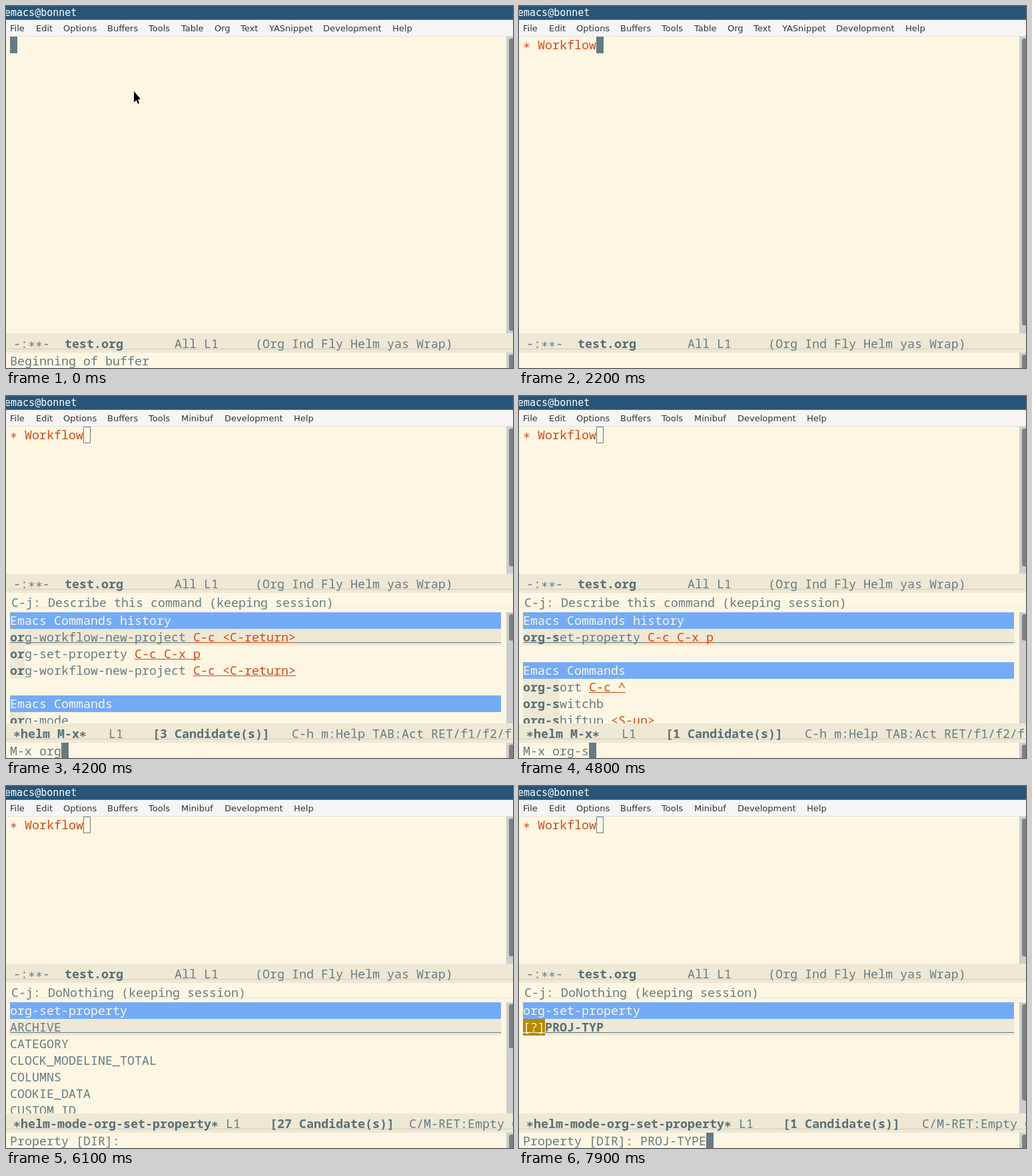
Animation, 761 px wide and 544 px high, one loop 8 s. Source, as an HTML page with a canvas:

```html
<!DOCTYPE html>
<html lang="en">
<head>
<meta charset="utf-8">
<title>Editor session</title>
<style>
html, body { margin: 0; width: 100%; height: 100%; overflow: hidden; background: #fdf6e3; }
canvas { display: block; }
</style>
</head>
<body>
<canvas id="stage" width="761" height="544"></canvas>
<script>
const ctx = document.getElementById('stage').getContext('2d');
const LOOP = 8000, CELL = 11, ROW = 25, LEFT = 6;
const C = {
  paper: '#fdf6e3', bar: '#eee8d5', text: '#657b83', strong: '#586e75', orange: '#cb4b16',
  blue: '#74abf7', gold: '#b58900', line: '#cccec4', trough: '#cdcdcd', slider: '#7e8182'
};
const MONO = '"Noto Sans Mono", "DejaVu Sans Mono", monospace';

// Font size whose advance equals one character cell.
ctx.font = `100px ${MONO}`;
const SIZE = CELL * 100 / ctx.measureText('m').width;
const REGULAR = `${SIZE}px ${MONO}`, BOLD = `bold ${SIZE}px ${MONO}`;

const MENU = [['File', 6], ['Edit', 45], ['Options', 86], ['Buffers', 152], ['Tools', 214]];
const ORG_MENU = [...MENU, ['Table', 263], ['Org', 313], ['Text', 352], ['YASnippet', 395],
  ['Development', 476], ['Help', 580]];
const MINI_MENU = [...MENU, ['Minibuf', 263], ['Development', 328], ['Help', 432]];

const HISTORY = ['org-workflow-new-project|C-c <C-return>', 'org-set-property|C-c C-x p',
  'org-workflow-new-project|C-c <C-return>', 'magit-status|C-x g'];
const COMMANDS = {
  '': [], o: ['org-mode'], or: ['org-mode'], org: ['org-mode'], 'org-': ['org-mode'],
  'org-s': ['org-sort|C-c ^', 'org-switchb', 'org-shiftup|<S-up>'],
  'org-se': ['org-set-tags', 'org-set-effort|C-c C-x e', 'org-search-view'],
  'org-set': ['org-set-tags', 'org-set-effort|C-c C-x e', 'org-set-tags-command|C-c C-q'],
  'org-set-': ['org-set-tags', 'org-set-effort|C-c C-x e', 'org-set-tags-command|C-c C-q']
};
const PROPERTIES = ['ARCHIVE', 'CATEGORY', 'CLOCK_MODELINE_TOTAL', 'COLUMNS', 'COOKIE_DATA', 'CUSTOM_ID'];
const WITH_P = ['DESCRIPTION', 'EXPORT_AUTHOR', 'EXPORT_DATE', 'EXPORT_FILE_NAME', 'EXPORT_OPTIONS'];

// [time, typed text] and, for the prompts, [time, typed, filtered]
const HEADING = [[0, ''], [500, '*'], [900, '* '], [1200, '* W'], [1400, '* Wo'], [1500, '* Wor'],
  [1600, '* Work'], [1900, '* Workf'], [2000, '* Workfl'], [2100, '* Workflo'], [2200, '* Workflow']];
const COMMAND = [[3700, '', ''], [4000, 'o', ''], [4100, 'or', 'o'], [4200, 'org', 'or'],
  [4300, 'org-', 'org'], [4400, 'org-', 'org-'], [4800, 'org-s', 'org-s'], [4900, 'org-se', 'org-se'],
  [5000, 'org-set', 'org-set'], [5100, 'org-set-', 'org-set-']];
const PROPERTY = [[5500, '', ''], [6600, 'P', ''], [6700, 'P', 'P'], [6800, 'PR', 'P'], [6900, 'PR', 'PR'],
  [7000, 'PRO', 'PRO'], [7100, 'PROJ', 'PROJ'], [7300, 'PROJ-', 'PROJ-'], [7500, 'PROJ-T', 'PROJ-'],
  [7600, 'PROJ-T', 'PROJ-T'], [7700, 'PROJ-TY', 'PROJ-TY'], [7800, 'PROJ-TYP', 'PROJ-TYP'],
  [7900, 'PROJ-TYPE', 'PROJ-TYP']];

const at = (steps, t) => steps.filter(s => s[0] <= t).pop();

function rect(x, y, w, h, color) {
  ctx.fillStyle = color;
  ctx.fillRect(x, y, w, h);
}

// Draws one run of cells and returns the x where the next begins.
function put(s, x, top, { color = C.text, bold, bg, under } = {}) {
  const w = s.length * CELL;
  if (bg) rect(x, top, w, ROW, bg);
  if (under) rect(x, top + 20, w, 1, color);
  ctx.font = bold ? BOLD : REGULAR;
  ctx.fillStyle = color;
  // The asterisk sits at mid-height, as the operator glyph does.
  ctx.fillText(s.replaceAll('*', '\u2217'), x, top + 19);
  return x + w;
}

function scrollbar(top, bottom, from, to) {
  rect(751, top, 10, bottom - top, C.trough);
  ctx.fillStyle = C.slider;
  ctx.beginPath();
  ctx.roundRect(755, from, 12, to - from, 3);
  ctx.fill();
}

function chrome(menu) {
  rect(0, 0, 761, 20, '#285577');
  rect(0, 20, 761, 1, '#4c7899');
  ctx.font = '15px "DejaVu Sans Mono", monospace';
  ctx.fillStyle = '#ffffff';
  ctx.fillText('emacs@bonnet', -2, 15);
  rect(0, 21, 761, 24, '#f6f5f4');
  rect(0, 45, 761, 1, '#e4e1dc');
  ctx.font = '13px "DejaVu Sans", sans-serif';
  ctx.fillStyle = '#2e3436';
  for (const [label, x] of menu) ctx.fillText(label, x, 38);
}

function modeLine(y, runs) {
  rect(0, y, 761, 29, C.bar);
  rect(0, y + 23, 761, 1, C.line);
  let x = 0;
  for (const [s, bold] of runs) {
    x = put(s, x, y + 3, { bold, color: bold ? C.strong : C.text });
  }
}

const bufferLine = y =>
  modeLine(y, [[' -:**-  '], ['test.org', true], ['       All L1     (Org Ind Fly Helm yas Wrap)']]);

function pointer() {
  const p = [[192, 128], [192, 145], [195.7, 141.5], [198, 147], [200.2, 146], [198, 140.6], [202, 140]];
  ctx.beginPath();
  p.forEach(([x, y]) => ctx.lineTo(x, y));
  ctx.closePath();
  ctx.lineJoin = 'round';
  ctx.lineWidth = 2;
  ctx.strokeStyle = '#ffffff';
  ctx.stroke();
  ctx.fillStyle = '#000000';
  ctx.fill();
}

function minibuffer(text, cursor) {
  const x = put(text, LEFT, 521);
  if (cursor) rect(x, 521, CELL, ROW, C.text);
  scrollbar(521, 544, 524, 560);
}

function sourceHeader(s, top) {
  rect(LEFT, top, 737, ROW, C.blue);
  put(s, LEFT, top, { color: C.paper });
}

function selection(top) {
  rect(LEFT, top, 737, ROW, C.bar);
  rect(LEFT, top + 20, 737, 1, C.text);
}

// One list entry "name|key", with the matching part emphasised.
function candidate(entry, match, top, selected) {
  const [name, key] = entry.split('|');
  if (selected) selection(top);
  const i = match ? name.indexOf(match) : 0;
  let x = put(name.slice(0, i), LEFT, top);
  x = put(match, x, top, { color: C.strong, bold: true, bg: selected ? null : C.bar, under: selected });
  x = put(name.slice(i + match.length), x, top);
  if (key) put(key, x + CELL, top, { color: C.orange, under: true });
}

function helmFrame(hint, body) {
  bufferLine(267);
  rect(0, 318, 761, 1, C.bar);
  put(hint + ' (keeping session)', 8, 298);
  ctx.save();
  ctx.beginPath();
  ctx.rect(0, 325, 761, 167);
  ctx.clip();
  body();
  ctx.restore();
}

function commandPrompt(t) {
  const [, typed, filter] = at(COMMAND, t);
  const past = HISTORY.filter(e => e.split('|')[0].includes(filter));
  helmFrame('C-j: Describe this command', () => {
    let y = 325;
    sourceHeader('Emacs Commands history', y);
    past.forEach((e, i) => candidate(e, filter, y += ROW, i === 0));
    sourceHeader('Emacs Commands', y += 2 * ROW);
    COMMANDS[filter].forEach(e => candidate(e, filter, y += ROW));
  });
  scrollbar(325, 492, 328, 367.5);
  modeLine(492, [[' '], ['*helm M-x*', true], ['   L1    '], [`[${past.length} Candidate(s)]`, true],
    ['   C-h m:Help TAB:Act RET/f1/f2/f-n:NthAct']]);
  minibuffer('M-x ' + typed, true);
}

function propertyPrompt(t) {
  const [, typed, filter] = at(PROPERTY, t);
  const count = filter === '' ? 27 : filter === 'P' ? 11 : 1;
  helmFrame('C-j: DoNothing', () => {
    let y = 325;
    sourceHeader('org-set-property', y);
    if (filter) {
      selection(y += ROW);
      const x = put('[?]', LEFT, y, { color: C.paper, bg: C.gold, under: true });
      put(filter, x, y, { color: C.strong, bold: true, under: true });
    }
    const list = count === 27 ? PROPERTIES : count === 11 ? WITH_P : [];
    list.forEach((e, i) => candidate(e, filter, y += ROW, !filter && i === 0));
  });
  const end = t < 5600 ? 367.5 : count === 27 ? 394 : count === 11 ? 414 : 478 - 0.7 * filter.length;
  scrollbar(325, 492, 328, end);
  const tally = `[${count} Candidate(s)]`;
  modeLine(492, [[' '], ['*helm-mode-org-set-property*', true], [' L1    '],
    [tally.padEnd(19), true], ['C/M-RET:Empty C-h m:Help']]);
  minibuffer('Property [DIR]: ' + typed, t < 6100 || t >= 6600);
}

function draw(t) {
  const prompt = t >= 3700;
  rect(0, 0, 761, 544, C.paper);
  chrome(prompt ? MINI_MENU : ORG_MENU);

  const heading = at(HEADING, t)[1];
  const x = put(heading, LEFT, 46, { color: heading.length > 1 ? C.orange : C.text });
  if (prompt) {
    ctx.lineWidth = 1;
    ctx.strokeStyle = C.text;
    ctx.strokeRect(x + 0.5, 46.5, CELL - 1, ROW - 1);
    scrollbar(46, 267, 49, 256);
    if (t < 5500) commandPrompt(t);
    else propertyPrompt(t);
    return;
  }
  if (t < 300 || t >= 500) rect(x, 46, CELL, ROW, C.text);
  scrollbar(46, 492, 49, 488 - 0.8 * heading.length);
  bufferLine(492);
  minibuffer(t < 500 ? 'Beginning of buffer' : '', false);
  if (t < 500) pointer();
}

const start = performance.now();
function tick() {
  draw((performance.now() - start) % LOOP);
  requestAnimationFrame(tick);
}
tick();
</script>
</body>
</html>
```
